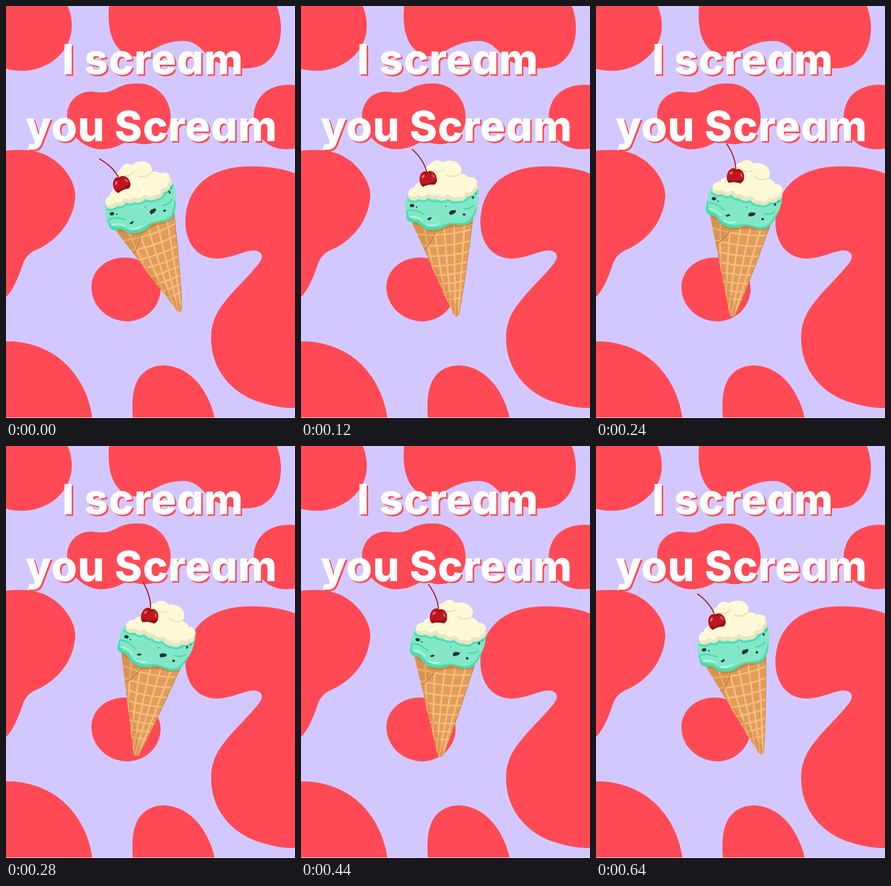
Recreate the animation shown at these times as an HTML page. Size 572 px wide and 814 px high, loop 0.68 s.

```html
<!DOCTYPE html>
<html lang="en">
<head>
<meta charset="utf-8">
<title>I scream</title>
<style>
  html, body { margin: 0; height: 100%; overflow: hidden; background: #d2c8ff; }
  svg { display: block; width: 100vw; height: 100vh; }
  text {
    font: 800 83px Inter, sans-serif;
    font-feature-settings: "cv11";
    letter-spacing: 1px;
    text-anchor: middle;
  }
  .line { fill: none; stroke-linecap: round; stroke-linejoin: round; }
</style>
</head>
<body>
<svg viewBox="0 0 572 814">
  <defs>
    <clipPath id="coneShape"><path id="cone" d="M216 420L301 610Q306 617 312 610C321 568 332 490 342 410Z"/></clipPath>
    <clipPath id="mintShape"><path id="mint" d="M213 368C206 382 206 400 209 412C207 421 213 428 222 427C230 426 234 430 240 436C249 444 269 444 280 438C290 432 300 429 311 432C326 435 339 428 341 419C348 409 347 400 350 392C353 381 353 369 350 356Z"/></clipPath>
    <clipPath id="creamShape"><path id="cream" d="M213 377C210 366 217 359 225 358C226 351 232 349 237 346C240 339 242 335 246 332C246 321 249 315 256 313C261 304 274 302 280 309C288 304 305 305 311 311C318 317 319 325 316 331C323 332 329 334 332 339C342 336 351 343 349 352C352 358 350 365 344 367C342 373 335 377 328 375C326 383 318 387 311 384C304 387 295 384 291 379C284 385 274 386 269 380C262 383 256 381 252 377C248 383 240 385 234 380C226 385 215 385 213 377Z"/></clipPath>
  </defs>

  <path fill="#ff4a55" d="
    M0 0H122C131 20 133 46 126 65C112 105 72 128 32 128Q14 128 0 124Z
    M204 0C200 45 210 76 231 91C248 104 268 101 287 88C308 76 326 69 352 69C384 70 390 96 420 112C444 124 480 127 504 118C546 98 552 42 536 0Z
    M121 217C121 189 142 168 170 169C197 173 205 170 220 162C235 154 249 153 262 153C300 153 326 185 326 220C326 250 305 273 275 273C256 273 250 265 232 271C215 281 200 283 185 283C150 280 122 250 121 217Z
    M572 156C541 153 510 163 497 190Q487 211 492 232C500 262 520 283 555 283L572 282Z
    M0 286C15 284 40 283 60 288C105 298 140 345 137 378C132 430 100 460 70 477C50 486 42 490 34 508C25 535 15 560 0 575Z
    M572 331C545 320 510 316 475 317C400 320 357 360 355 425C355 470 380 500 420 499C450 497 475 482 492 483C508 485 510 496 501 508C482 533 454 557 431 587C413 610 405 632 406 660C408 730 460 770 500 782C525 790 550 795 572 794Z
    M169 555C170 520 200 497 235 497C275 497 307 525 306 562C303 600 272 623 239 623C200 622 169 592 169 555Z
    M0 663C30 661 70 671 100 692C142 722 164 767 171 814H0Z
    M251 814C249 785 250 755 263 735C275 718 292 710 313 710C345 711 372 730 390 758Q408 787 413 814Z"/>
  <path fill="#fff" d="M0 813H572V814H0Z"/>

  <g fill="#ff4a55" transform="translate(3 3)">
    <text x="290.5" y="135">I scream</text>
    <text x="288" y="267">you Scream</text>
  </g>
  <g fill="#fff">
    <text x="290.5" y="135">I scream</text>
    <text x="288" y="267">you Scream</text>
  </g>

  <g id="treat">
    <g clip-path="url(#coneShape)">
      <use href="#cone" fill="#e29d5a"/>
      <path id="waffle" class="line" stroke="#f8bd7d" stroke-width="3.4"/>
      <path fill="#b87532" fill-opacity=".25" d="M216 420L306 617L314 604L287 555L245 478Q258 459 266 438Z"/>
      <path class="line" stroke="#c98442" stroke-width="2.5" d="M268 438Q262 463 245 480M342 410C332 490 321 568 312 612"/>
      <path fill="#b87532" fill-opacity=".55" d="M210 418Q222 432 236 434C250 448 273 448 285 441C302 433 322 440 342 428V400H210Z"/>
    </g>

    <use href="#mint" fill="#82e8c8"/>
    <g class="line" clip-path="url(#mintShape)" stroke="#49dcae">
      <path stroke-width="8" d="M207 408C211 426 222 424 232 427C243 439 258 444 278 438C296 428 312 435 325 432Q342 427 349 401"/>
      <path stroke-width="3" d="M212 383Q223 390 234 384Q244 389 252 382Q261 388 270 385Q281 390 291 384Q302 391 312 388Q326 388 330 380Q344 377 351 366"/>
      <path stroke-width="3" d="M210 404C226 400 234 408 244 411M342 394Q334 402 323 401"/>
      <path stroke="#b9f5e1" stroke-width="2.5" d="M215 416Q229 414 240 423M249 432Q261 435 272 430"/>
    </g>
    <g fill="#26343a">
      <ellipse cx="220" cy="394" rx="4.5" ry="3.2"/>
      <circle cx="229" cy="397" r="1.4"/>
      <path d="M293 408L297 404L306 403L307 407L302 411L295 413Z"/>
      <ellipse cx="323" cy="412" rx="2.8" ry="2.2"/>
      <path d="M249 421L256 417L259 419L254 423Z"/>
      <circle cx="287" cy="396" r=".9"/>
      <circle cx="346" cy="371" r="1"/>
      <path d="M337 377L342 376L343 380L339 382L340 379Z"/>
    </g>

    <use href="#cream" fill="#fff9d7"/>
    <g class="line" clip-path="url(#creamShape)" stroke="#ece5bf">
      <path stroke-width="8" d="M211 377Q221 385 232 377Q243 385 252 374Q261 382 270 377Q281 385 291 376Q302 386 312 381Q325 384 328 372Q341 375 344 364Q352 361 351 349"/>
      <path stroke-width="3" d="M316 331Q303 341 289 334M282 323Q274 330 263 326"/>
    </g>

    <path class="line" stroke="#a51c26" stroke-width="2.2" d="M250 330Q244 304 221 283"/>
    <path fill="#bd171f" d="M250 328C258 322 269 330 269 341C270 347 267 351 264 353C257 352 249 353 242 357C237 354 235 348 235 342C235 330 244 323 250 328Z"/>
    <path fill="#8f101a" d="M269 341C270 347 267 351 264 353C257 352 249 353 242 357L237 351Q259 353 269 341Z"/>
    <path class="line" stroke="#8f101a" stroke-width="2" d="M245 329Q250 332 256 328"/>
    <path fill="#e4787a" d="M239 341Q239 335 244 333L245 337ZM260 332Q265 335 265 340L262 339Z"/>
  </g>
</svg>
<script>
  const STEP = 40, STEPS = 17, PEAK = 8, SWING = 34.6, REST = 13.2;
  const treat = document.getElementById('treat');

  // Lattice: sagging rings that tighten downwards, and ribs that close in on the tip.
  let lattice = '';
  for (let i = 0; i < 8; i++) {
    const y = 450 + 22 * i - 0.5 * i * i;
    lattice += `M205 ${y - 2}Q285 ${y + 10} 350 ${y - 12}`;
  }
  for (let i = 0; i < 5; i++) {
    const x = 240 + 21 * i, end = 300 + (x - 285) * 0.25;
    lattice += `M${x} 420Q${x + (end - x) * 0.35} 510 ${end} 620`;
  }
  document.getElementById('waffle').setAttribute('d', lattice);

  // Quick swing clockwise, slower swing back, held on 25 steps per second.
  function draw(now) {
    const step = Math.floor(now / STEP) % STEPS;
    const angle = step <= PEAK ? SWING * step / PEAK : SWING - 3.57 * (step - PEAK);
    treat.setAttribute('transform', `rotate(${angle - REST} 286 447)`);
    requestAnimationFrame(draw);
  }
  draw(performance.now());
</script>
</body>
</html>
```
